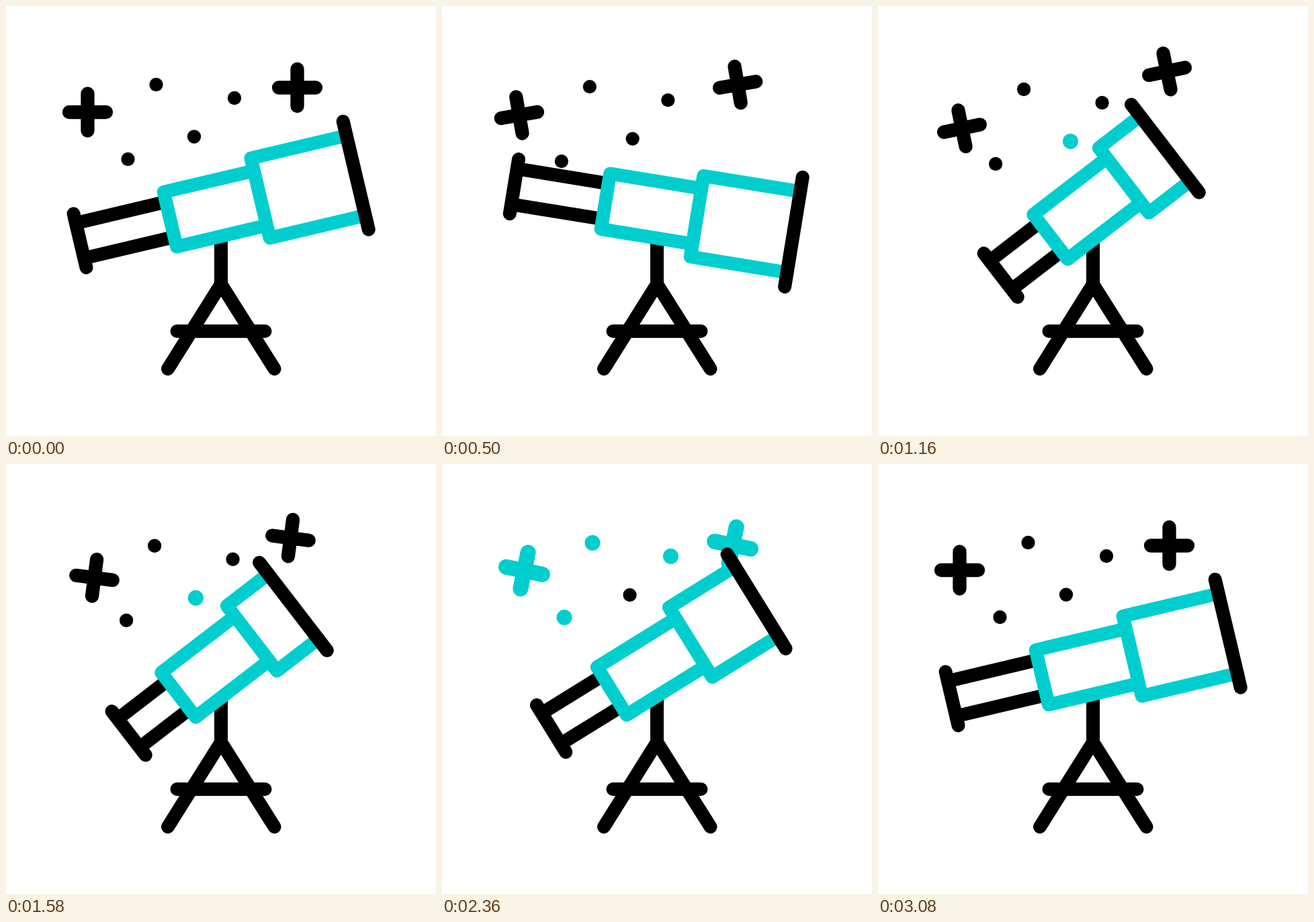
Write an HTML page that moves like this. It is 640x640 px and loops after 3.6 s.

```html
<!DOCTYPE html>
<html lang="en">
<head>
<meta charset="utf-8">
<title>Telescope</title>
<style>
  html, body { margin: 0; width: 100%; height: 100%; overflow: hidden; background: #fff; }
  svg { display: block; width: 100%; height: 100%; }
  #scene { fill: none; stroke: #000; stroke-width: 20; stroke-linecap: round; stroke-linejoin: round; }
  .teal { stroke: #00cece; fill: #fff; }
</style>
</head>
<body>
<svg viewBox="0 0 640 640">
  <g id="scene">
    <g id="sky"></g>
    <path d="M320 346V414M241 540L320 414L399.5 540M254.5 484H385.5"/>
    <g id="scope">
      <path id="eyepiece"/>
      <path class="teal" d="M69.4 -41.8H-68.5V41.8H69.4"/>
      <path id="barrel" class="teal"/>
      <path id="lens"/>
    </g>
  </g>
</svg>
<script>
const LOOP = 3600, DRIFT = 2700, TEAL = '#00cece';
const byId = id => document.getElementById(id);
const set = (el, attrs) => { for (const k in attrs) el.setAttribute(k, attrs[k]); };

const smooth = u => (1 - Math.cos(Math.PI * u)) / 2;
const easeOut = u => 1 - (1 - u) ** 2.5;
// Eased 0..1 progress between two times.
const step = (t, from, to, ease = smooth) =>
  ease(Math.min(1, Math.max(0, (t - from) / (to - from))));

const bezier = (s, a, b, end = 0) =>
  3 * s * (1 - s) ** 2 * a + 3 * s * s * (1 - s) * b + s ** 3 * end;

// Slow start, quick middle and long settling: a cubic timing curve.
function surge(u) {
  let low = 0, high = 1;
  for (let i = 0; i < 20; i++) {
    const mid = (low + high) / 2;
    if (bezier(mid, 0.61, 0.115, 1) < u) low = mid; else high = mid;
  }
  return bezier(low, 0, 1, 1);
}

const tilt = t => 13.3 - 26.6 * step(t, 0, 421) + 50.9 * step(t, 425, 843)
  + 9.1 * step(t, 1650, 1978) - 33.4 * step(t, 1978, 2800);
const lensSlide = t => 68.5 * (step(t, 500, 1080, easeOut) - step(t, 2120, 3000, easeOut));
const eyeSlide = t => 44.5 * (step(t, 500, 1000, easeOut) - step(t, 2270, 3000, easeOut));
const spin = t => -16.5 * step(t, 0, 900) + 33 * step(t, 900, 1950) - 16.5 * step(t, 1950, 3080);

// Each star drifts once round a closed loop back to its place.
function crossDrift(t) {
  const s = step(t, 0, DRIFT, surge);
  return [bezier(s, -55.6, 42.6), bezier(s, 34, 34)];
}
function dotDrift(t) {
  const s = step(t, 0, DRIFT);
  return [bezier(s, -18, 5), bezier(s, 14.5, 2.4)];
}

const twinkle = t => (t >= 640 && t < 1080) || (t >= 1850 && t < 2560);
const longTwinkle = t => t >= 640 && t < 2240;

function addStar(x, y, options) {
  const el = document.createElementNS('http://www.w3.org/2000/svg', 'path');
  byId('sky').append(el);
  return { x, y, el, flipX: 1, flipY: 1, glow: twinkle, ...options };
}
const cross = { d: 'M-27.5 0H27.5M0 -27.5V27.5', drift: crossDrift, turn: spin };
const dot = { d: 'M0 0h0.01', drift: dotDrift, turn: () => 0 };
const stars = [
  addStar(121.5, 158, cross),
  addStar(433.5, 121.5, { ...cross, flipX: -1, flipY: -1 }),
  addStar(223.5, 117, dot),
  addStar(340, 137, dot),
  addStar(181.5, 228, dot),
  addStar(280, 194.5, { ...dot, flipX: -1, glow: longTwinkle })
];

function draw(t) {
  for (const star of stars) {
    const [dx, dy] = star.drift(t), lit = star.glow(t);
    const x = star.x + dx * star.flipX, y = star.y + dy * star.flipY;
    set(star.el, {
      d: star.d,
      transform: `translate(${x} ${y}) rotate(${star.turn(t)})`,
      stroke: lit ? TEAL : '#000',
      'stroke-width': lit ? 23 : 20.3
    });
  }
  const eye = -206.5 + eyeSlide(t), lens = 215.5 - lensSlide(t);
  set(byId('eyepiece'), { d: `M${eye} -41.1V41.1M${eye} -26.8H-70M${eye} 26.8H-70` });
  set(byId('barrel'), { d: `M${lens} -61H69.4V61H${lens}` });
  set(byId('lens'), { d: `M${lens} -82.6V82.6` });
  set(byId('scope'), { transform: `translate(311 301.8) rotate(${-tilt(t)})` });
}

const start = performance.now();
function tick() {
  draw((performance.now() - start) % LOOP);
  requestAnimationFrame(tick);
}
tick();
</script>
</body>
</html>
```
